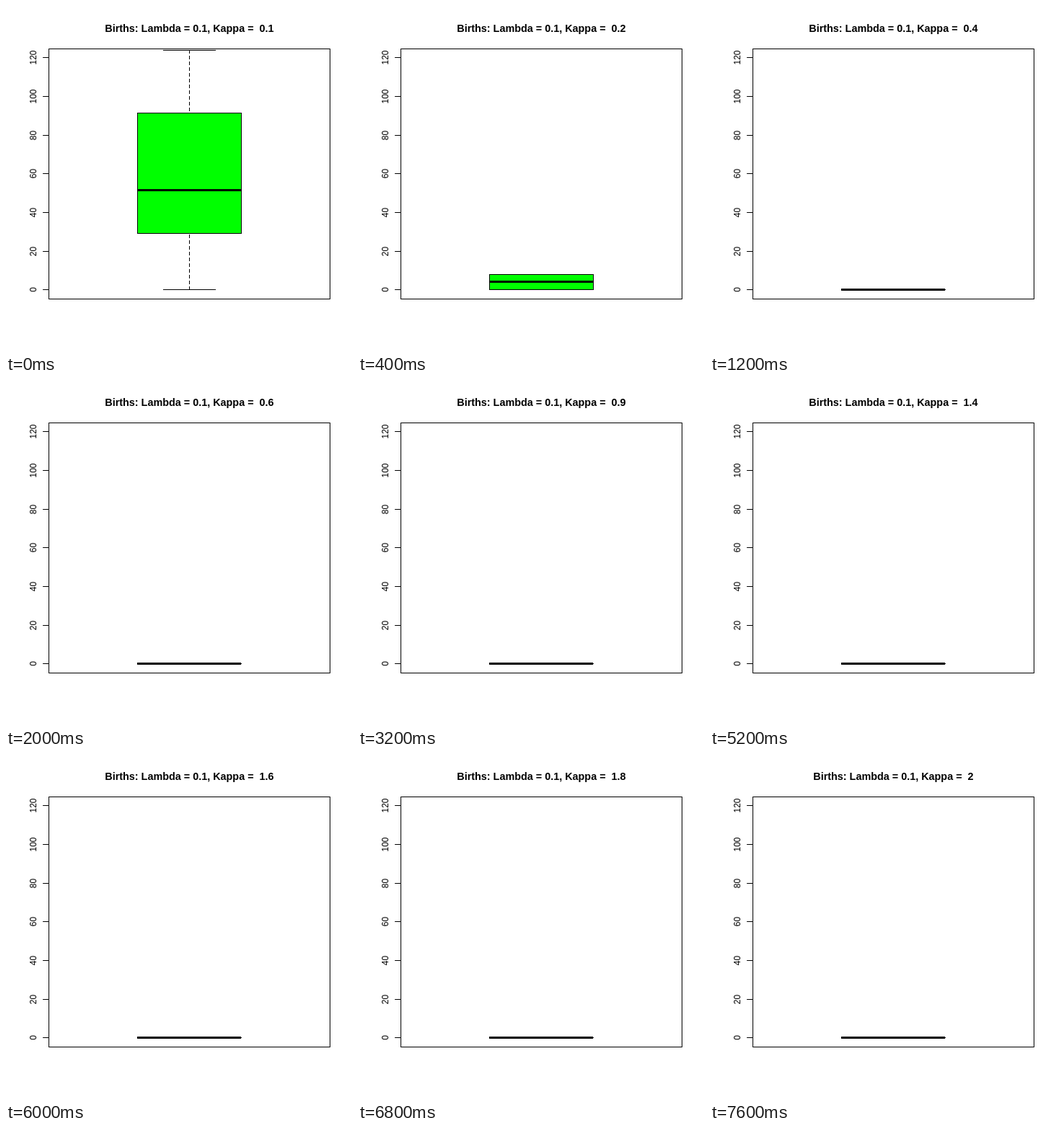
An HTML page with a canvas that plays this animation: 480 px wide and 480 px high, repeating every 8000 ms.

```html
<!DOCTYPE html>
<html lang="en">
<head>
<meta charset="utf-8">
<title>Births box plot</title>
<style>
html, body { margin: 0; width: 100%; height: 100%; overflow: hidden; background: #fff; }
canvas { display: block; }
</style>
</head>
<body>
<canvas id="plot" width="480" height="480"></canvas>
<script>
const ctx = document.getElementById("plot").getContext("2d");
const STEP = 400, COUNT = 20;
const FONT = '"Liberation Sans", Arial, sans-serif';
const MID = 254, LEFT = 182, RIGHT = 326;

// Five-number summaries by step; every other step is all zeros.
const summaries = {
  0: [0, 29, 51.5, 91.5, 124],
  1: [0, 0, 4, 8, 8],
  2: [1, 1, 2, 3, 3],
  4: [1, 1, 1, 1, 1],
  6: [1, 1, 1, 1, 1],
  9: [1, 1, 1, 1, 1]
};
const outliers = { 9: 0 };

const yOf = v => Math.floor(393.69 - v * 2.6815);

// Pixel lines, both ends included.
const hLine = (x0, x1, y) => ctx.fillRect(x0, y, x1 - x0 + 1, 1);
const vLine = (x, y0, y1) => ctx.fillRect(x, y0, 1, y1 - y0 + 1);

function frame(x0, y0, x1, y1) {
  hLine(x0, x1, y0);
  hLine(x0, x1, y1);
  vLine(x0, y0, y1);
  vLine(x1, y0, y1);
}

function whisker(end, hinge) {
  const from = yOf(end), to = yOf(hinge);
  const dir = Math.sign(to - from), len = Math.abs(to - from);
  for (let d = 0; d <= len; d++) {
    if (d % 8 < 5) ctx.fillRect(MID, from + dir * d, 1, 1);
  }
  hLine(218, 290, from);
}

function drawBox([min, q1, med, q3, max]) {
  const top = yOf(q3), bottom = yOf(q1);
  ctx.fillStyle = "#0f0";
  ctx.fillRect(LEFT, top, RIGHT - LEFT + 1, bottom - top + 1);
  ctx.fillStyle = "#000";
  ctx.fillRect(LEFT, yOf(med) - 1, RIGHT - LEFT, 3);
  whisker(min, q1);
  whisker(max, q3);
  frame(LEFT, top, RIGHT, bottom);
}

function drawOutlier(v) {
  ctx.beginPath();
  ctx.arc(MID + 0.5, yOf(v) + 0.5, 2.3, 0, Math.PI * 2);
  ctx.stroke();
}

function drawAxis() {
  frame(59, 59, 449, 406);
  ctx.font = "12px " + FONT;
  for (let v = 0; v <= 120; v += 20) {
    const y = yOf(v);
    hLine(51, 58, y);
    ctx.save();
    ctx.translate(42, y + 0.5);
    ctx.rotate(-Math.PI / 2);
    ctx.fillText(v, 0, 0);
    ctx.restore();
  }
}

function draw(step) {
  ctx.fillStyle = "#fff";
  ctx.fillRect(0, 0, 480, 480);
  ctx.fillStyle = ctx.strokeStyle = "#000";
  ctx.textAlign = "center";
  ctx.fontKerning = "none";
  drawAxis();
  ctx.font = "bold 14.4px " + FONT;
  ctx.fillText("Births: Lambda = 0.1, Kappa =  " + (step + 1) / 10, 254.4, 36);
  drawBox(summaries[step] || [0, 0, 0, 0, 0]);
  if (step in outliers) drawOutlier(outliers[step]);
}

const start = performance.now();
let shown = -1;
function tick() {
  const step = Math.floor((performance.now() - start) / STEP) % COUNT;
  if (step !== shown) draw(shown = step);
  requestAnimationFrame(tick);
}
tick();
</script>
</body>
</html>
```
